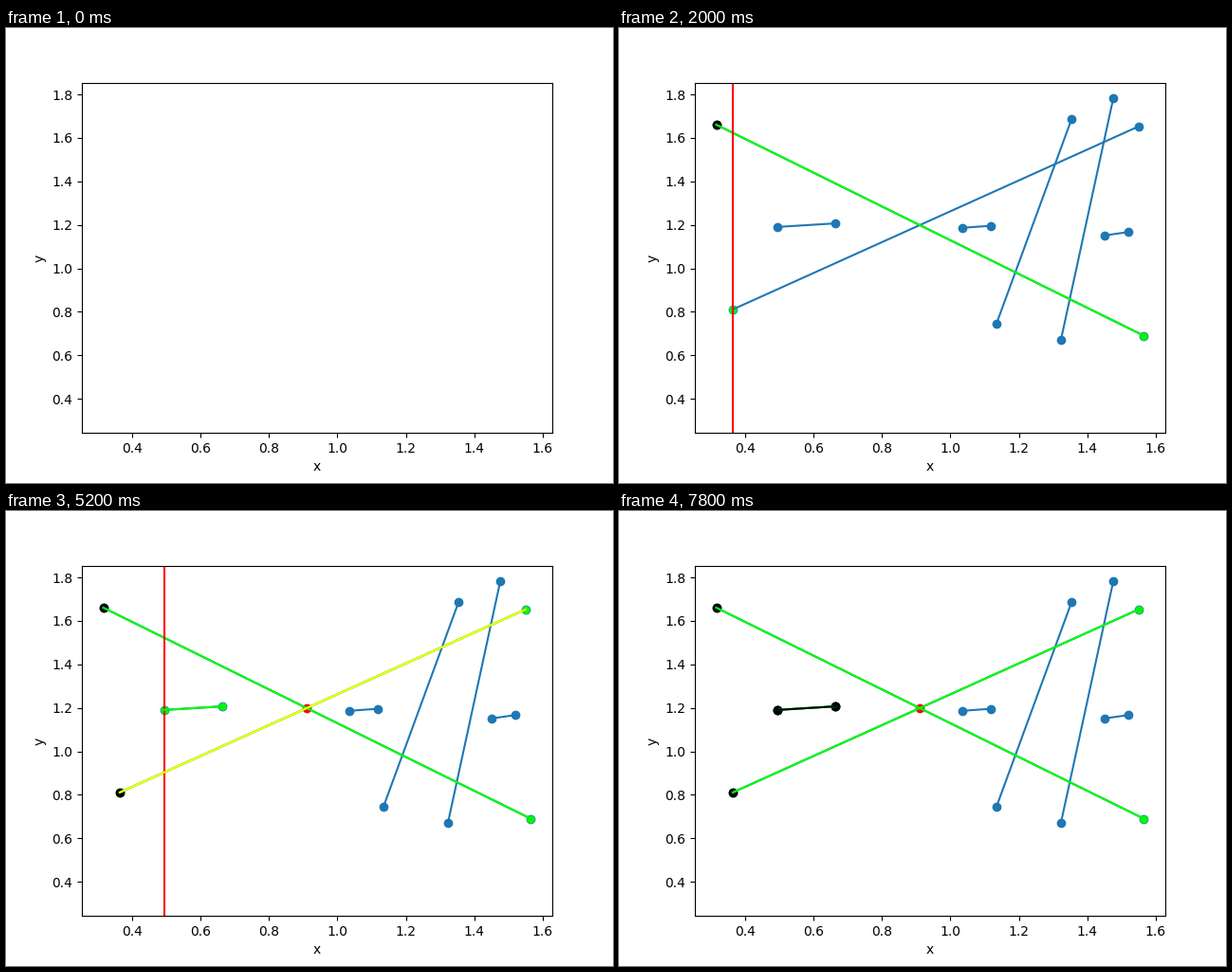
Recreate the animation shown at these times as a matplotlib script. Size 640 px wide and 480 px high, loop 8 s.

```python
import matplotlib.pyplot as plt
import numpy as np
from matplotlib.animation import ArtistAnimation

# Key points: (x, y) of each segment's left and right end
SEGMENTS = np.array([
    [(0.3158, 1.661), (1.5655, 0.690)],
    [(0.364, 0.811), (1.550, 1.653)],
    [(0.4945, 1.1905), (0.664, 1.207)],
    [(1.035, 1.1865), (1.1185, 1.196)],
    [(1.1345, 0.745), (1.354, 1.686)],
    [(1.323, 0.671), (1.4758, 1.7812)],
    [(1.4505, 1.1515), (1.520, 1.167)],
])
Y_MIN = 0.3162
MARGIN = 0.05

ends = SEGMENTS.reshape(-1, 2)
low = np.array([ends[:, 0].min(), Y_MIN])
high = ends.max(axis=0)
pad = MARGIN * (high - low)

fig, ax = plt.subplots(figsize=(6.4, 4.8), dpi=100)
ax.set(xlabel="x", ylabel="y",
       xlim=(low[0] - pad[0], high[0] + pad[0]),
       ylim=(low[1] - pad[1], high[1] + pad[1]))
ax.autoscale(False)

shown = []
frames = [[]]


def snap():
    frames.append(list(shown))


def show(artist):
    shown.append(artist)
    snap()
    return artist


def hide(artist):
    shown.remove(artist)
    snap()


def dot(p, color, size=36):
    show(ax.scatter(p[0], p[1], s=size, color=color))


def stroke(i, color):
    return show(ax.plot(*SEGMENTS[i].T, color=color)[0])


def paint(i, color, size=36):
    """Recolour a segment: left end, line, right end."""
    left, right = SEGMENTS[i]
    dot(left, color, size)
    stroke(i, color)
    dot(right, color, size)


def crossing(i, j):
    """Intersection point of two segments, or None."""
    (a, b), (c, d) = SEGMENTS[i], SEGMENTS[j]
    t, u = np.linalg.solve(np.column_stack([b - a, c - d]), c - a)
    return a + t * (b - a) if 0 <= t <= 1 and 0 <= u <= 1 else None


def compare(i, j):
    """Highlight two neighbours while testing whether they cross."""
    pair = [stroke(k, "yellow") for k in (i, j)]
    p = crossing(i, j)
    if p is not None:
        dot(p, "red")
    for line in pair:
        hide(line)


def event(p, action):
    """Move the sweep line to p, run the action, then mark p as done."""
    sweep = show(ax.axvline(p[0], color="red"))
    action()
    hide(sweep)
    dot(p, "black")


def insert(i, *neighbours):
    def action():
        paint(i, "lime", 25)
        for j in neighbours:
            compare(i, j)
    event(SEGMENTS[i][0], action)


def delete(i):
    event(SEGMENTS[i][1], lambda: paint(i, "black"))


show(ax.scatter(*ends.T, color="C0"))
shown.extend(ax.plot(SEGMENTS[:, :, 0].T, SEGMENTS[:, :, 1].T, color="C0"))
snap()

insert(0)
insert(1, 0)
insert(2, 1, 0)
delete(2)

anim = ArtistAnimation(fig, frames, interval=200, repeat=True,
                       repeat_delay=0, blit=False)
plt.show()
```
